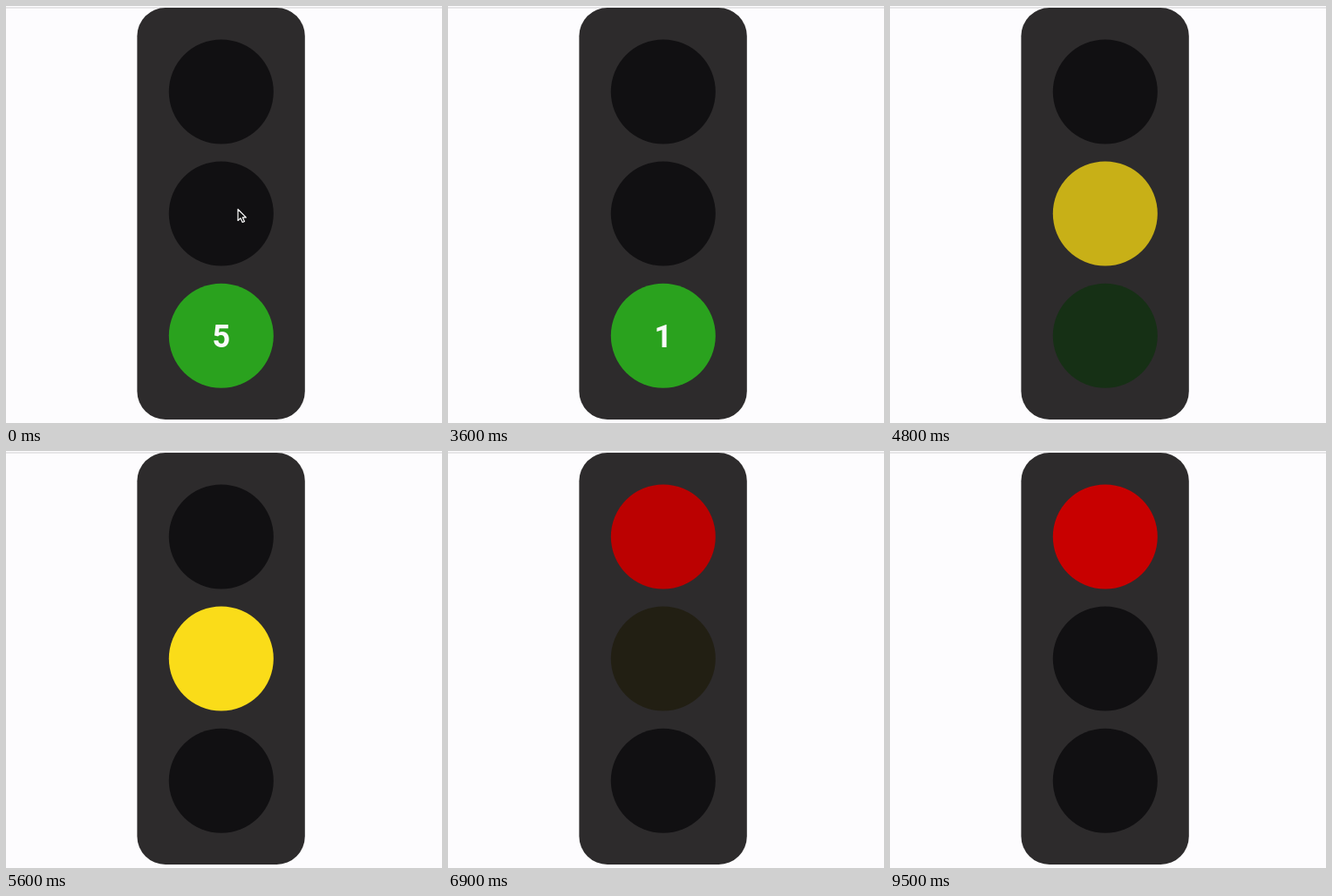
An HTML page that plays this animation: 500 by 479 pixels, repeating every 9600 ms.

```html
<!DOCTYPE html>
<html lang="en">
<head>
<meta charset="utf-8">
<title>Traffic light</title>
<style>
  html, body { margin: 0; height: 100%; overflow: hidden; background: #fdfcfe; }
  svg { display: block; width: 500px; height: 479px; }
  text { font: bold 36px Roboto, sans-serif; fill: #fafafa; text-anchor: middle; }
</style>
</head>
<body>
<svg viewBox="0 0 500 479">
  <rect y="1.5" width="500" height="1" fill="#d2d1d3"/>
  <rect x="150.4" y="2" width="192.4" height="473" rx="32.5" fill="#2d2b2c"/>
  <circle id="red" cx="246.8" cy="98.5" r="60"/>
  <circle id="yellow" cx="246.8" cy="238.5" r="60"/>
  <circle id="green" cx="246.8" cy="378.7" r="60"/>
  <text id="count" x="246.8" y="392"></text>
  <path id="cursor" d="M0 0V13L3 10.3L5.2 15L7.5 14L5.4 9.4H9.3Z"
        fill="#111" stroke="#fff" stroke-width="1.2" stroke-linejoin="round"/>
</svg>
<script>
const LOOP = 9600, FADE = 500, YELLOW_AT = 4560, RED_AT = 6565;
const OFF = [17, 16, 18];
const COLORS = { red: [200, 0, 0], yellow: [250, 220, 25], green: [42, 162, 30] };
const $ = id => document.getElementById(id);
const clamp = x => Math.min(1, Math.max(0, x));
const mix = (a, b, k) => a + (b - a) * k;
const smooth = x => x * x * (3 - 2 * x);

// CSS "ease": cubic-bezier(.25, .1, .25, 1), solved by bisection
function ease(x) {
  const bezier = (a, b, u) => 3 * a * u * (1 - u) ** 2 + 3 * b * u * u * (1 - u) + u ** 3;
  let low = 0, high = 1;
  for (let i = 0; i < 20; i++) {
    const mid = (low + high) / 2;
    if (bezier(.25, .25, mid) < x) low = mid; else high = mid;
  }
  return bezier(.1, 1, low);
}

function light(id, level) {
  const rgb = OFF.map((c, i) => Math.round(mix(c, COLORS[id][i], level)));
  $(id).setAttribute("fill", `rgb(${rgb})`);
}

function moveCursor(t) {
  const first = smooth(clamp((t - 50) / 950));
  const second = smooth(clamp((t - 1100) / 200));
  const x = mix(266, 440, first) + 22 * second;
  const y = mix(233.5, 285, first) + 10 * second;
  $("cursor").setAttribute("transform", `translate(${x} ${y})`);
  $("cursor").style.display = t < 1400 ? "" : "none";
}

function draw(now) {
  const t = now % LOOP;
  const toYellow = ease(clamp((t - YELLOW_AT) / FADE));
  const toRed = ease(clamp((t - RED_AT) / FADE));
  light("green", 1 - toYellow);
  light("yellow", toYellow - toRed);
  light("red", toRed);
  $("count").textContent = t < YELLOW_AT ? Math.ceil((YELLOW_AT - t) / 1000) : "";
  moveCursor(t);
}

const start = performance.now();
function tick() {
  draw(performance.now() - start);
  requestAnimationFrame(tick);
}
tick();
</script>
</body>
</html>
```
